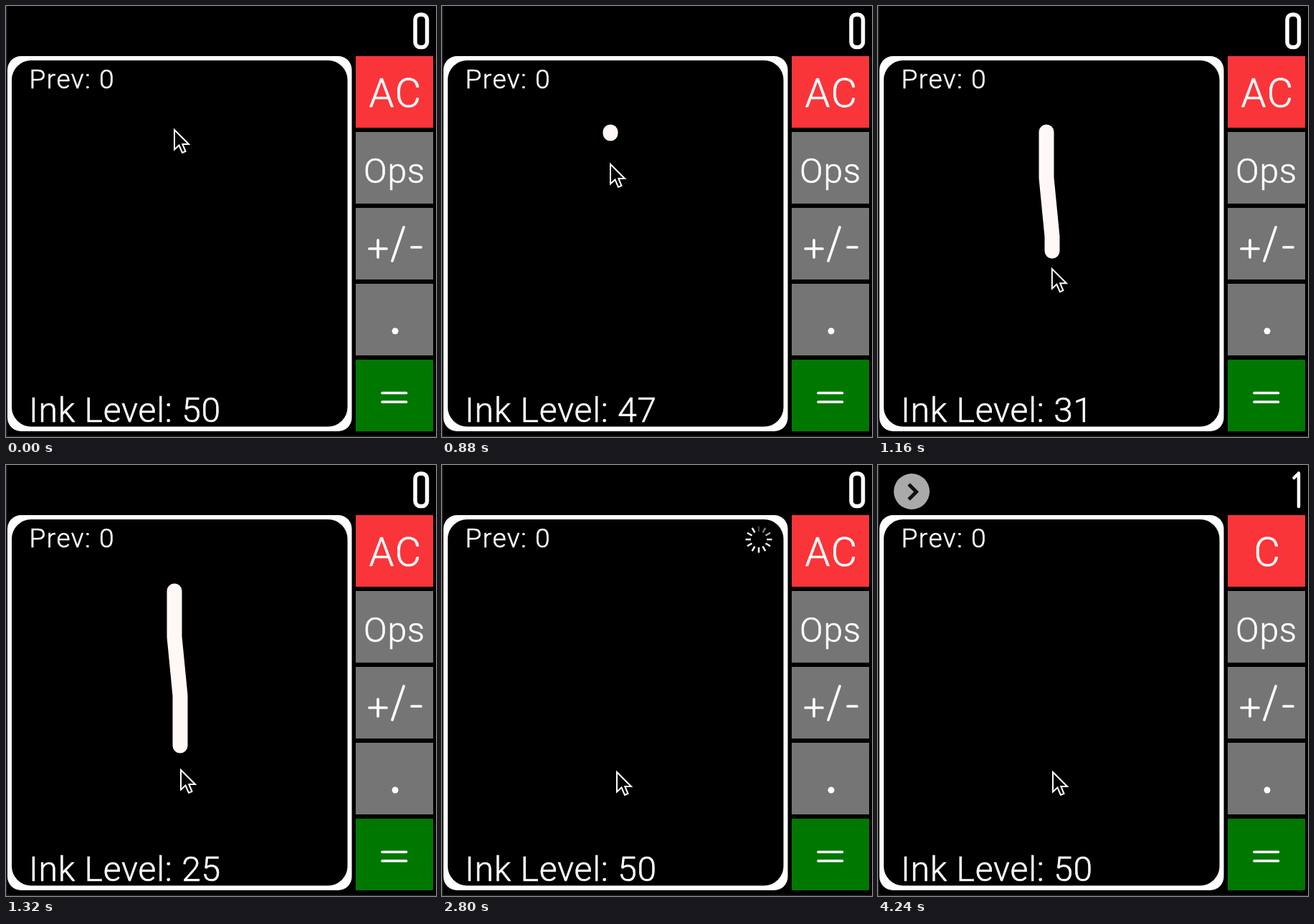
These frames come from a looping animation (600 px wide and 602 px high, 5.08 s). An HTML page:

```html
<!DOCTYPE html>
<html lang="en">
<head>
<meta charset="utf-8">
<title>Handwriting calculator</title>
<style>
  html, body { margin: 0; width: 100%; height: 100%; overflow: hidden; background: #000; }
  svg { display: block; width: 600px; height: 602px; }
  text { font-family: Roboto, "Open Sans", sans-serif; font-weight: 300; fill: #fff; stroke: #fff; stroke-width: 0.6; white-space: pre; }
  .line { fill: none; stroke: #fff; stroke-width: 3.7; stroke-linecap: round; stroke-linejoin: round; }
</style>
</head>
<body>
<svg viewBox="0 0 600 602">
  <path d="M0 0H1.5V600.5H600V602H0Z" fill="#222"/>
  <rect x="2" y="70" width="480.5" height="524" rx="19" fill="#fff"/>
  <rect x="8" y="76" width="468.5" height="511.5" rx="27"/>

  <rect x="488" y="70" width="108" height="100" fill="#f93539"/>
  <path d="M488 176h108v100h-108zM488 282h108v100h-108zM488 388h108v100h-108z" fill="#757575"/>
  <rect x="488" y="494" width="108" height="100" fill="#007800"/>
  <text id="clear" x="543.5" y="141" font-size="56" letter-spacing="1.5" text-anchor="middle">AC</text>
  <text x="542" y="247" font-size="48" letter-spacing="0.8" text-anchor="middle">Ops</text>
  <path class="line" d="M507 339H531M519 327V351M539 356L555 309M566 337H579M525 540.5H558.5M525 553H558.5"/>
  <circle cx="543" cy="454" r="4.5" fill="#fff"/>

  <text x="32.5" y="115" font-size="37" letter-spacing="1.5">Prev: 0</text>
  <text id="ink" x="32" y="580.5" font-size="48" letter-spacing="0.8"></text>

  <rect id="zero" class="line" x="571" y="12" width="16.5" height="45.5" rx="7" style="stroke-width:5.5"/>
  <g id="result">
    <path class="line" d="M580.5 18L587 11.5V58" style="stroke-width:4.5"/>
    <circle cx="47" cy="37" r="25" fill="#aaa"/>
    <path d="M43 27L53.5 37.5L43 48" fill="none" stroke="#111" stroke-width="5"/>
  </g>

  <g id="spinner" transform="translate(442 104)"></g>
  <path id="stroke" fill="none" stroke="#fff8f7" stroke-width="21" stroke-linecap="round" stroke-linejoin="round"/>
  <path id="cursor" d="M1 2V29.5L7.5 23.5L12 34L16.5 32L12.3 22H21Z" fill="#000" stroke="#fff" stroke-width="2"/>
</svg>
<script>
const LOOP = 5080, LAG = 90;
const el = id => document.getElementById(id);
const [clear, ink, zero, result, spinner, stroke, cursor] =
  ['clear', 'ink', 'zero', 'result', 'spinner', 'stroke', 'cursor'].map(el);

// Piecewise linear value through [position, value] pairs
function along(keys, p) {
  if (p <= keys[0][0]) return keys[0][1];
  for (let i = 1; i < keys.length; i++) {
    const [a, u] = keys[i - 1], [b, v] = keys[i];
    if (p <= b) return u + (v - u) * (p - a) / (b - a);
  }
  return keys[keys.length - 1][1];
}

const handX = [[950, 234], [1040, 241], [1320, 243]];
const handY = [[770, 171], [800, 174], [880, 219], [1040, 328], [1230, 387], [1320, 424], [1360, 427]];
const lineX = [[240, 235], [322, 243]];

const ticks = Array.from({ length: 12 }, (_, i) => {
  const tick = document.createElementNS('http://www.w3.org/2000/svg', 'path');
  tick.setAttribute('d', 'M0 -11V-18.5');
  tick.setAttribute('stroke', '#fff');
  tick.setAttribute('stroke-width', 2.5);
  tick.setAttribute('transform', `rotate(${i * 30})`);
  return spinner.appendChild(tick);
});
const tickCounts = [1, 3, 5, 8, 12];

const show = (node, on) => node.setAttribute('visibility', on ? 'visible' : 'hidden');

function draw(t) {
  const step = Math.min(Math.floor(t / 40) * 40, 1440);
  const drawing = t >= 800 && t < 1840, done = t >= 3040;

  cursor.setAttribute('transform', `translate(${along(handX, step)} ${along(handY, step)})`);

  const end = along(handY, step - LAG) + 5;
  const points = [176, 240, 322].filter(y => y < end).concat(end);
  stroke.setAttribute('d', 'M235 176L' + points.map(y => along(lineX, y) + ' ' + y).join('L'));
  show(stroke, drawing);

  let level = 50;
  if (t >= 640 && t < 800) level = 49;
  else if (t >= 800 && t < 880) level = 48;
  else if (drawing) level = Math.min(47, Math.ceil(47 - (end - 178) / 9.7));
  ink.textContent = 'Ink Level: ' + level;

  const phase = Math.floor((t - 1840) / 240);
  const count = t >= 1840 && !done ? tickCounts[phase] : 0;
  ticks.forEach((tick, i) => {
    const fade = phase === 4 ? Math.min(1, 0.25 + i * 0.22) : 1;
    tick.setAttribute('opacity', i < count ? fade : 0);
  });

  show(zero, !done);
  show(result, done);
  clear.textContent = done ? 'C' : 'AC';
}

function frame() {
  draw(performance.now() % LOOP);
  requestAnimationFrame(frame);
}
frame();
</script>
</body>
</html>
```
